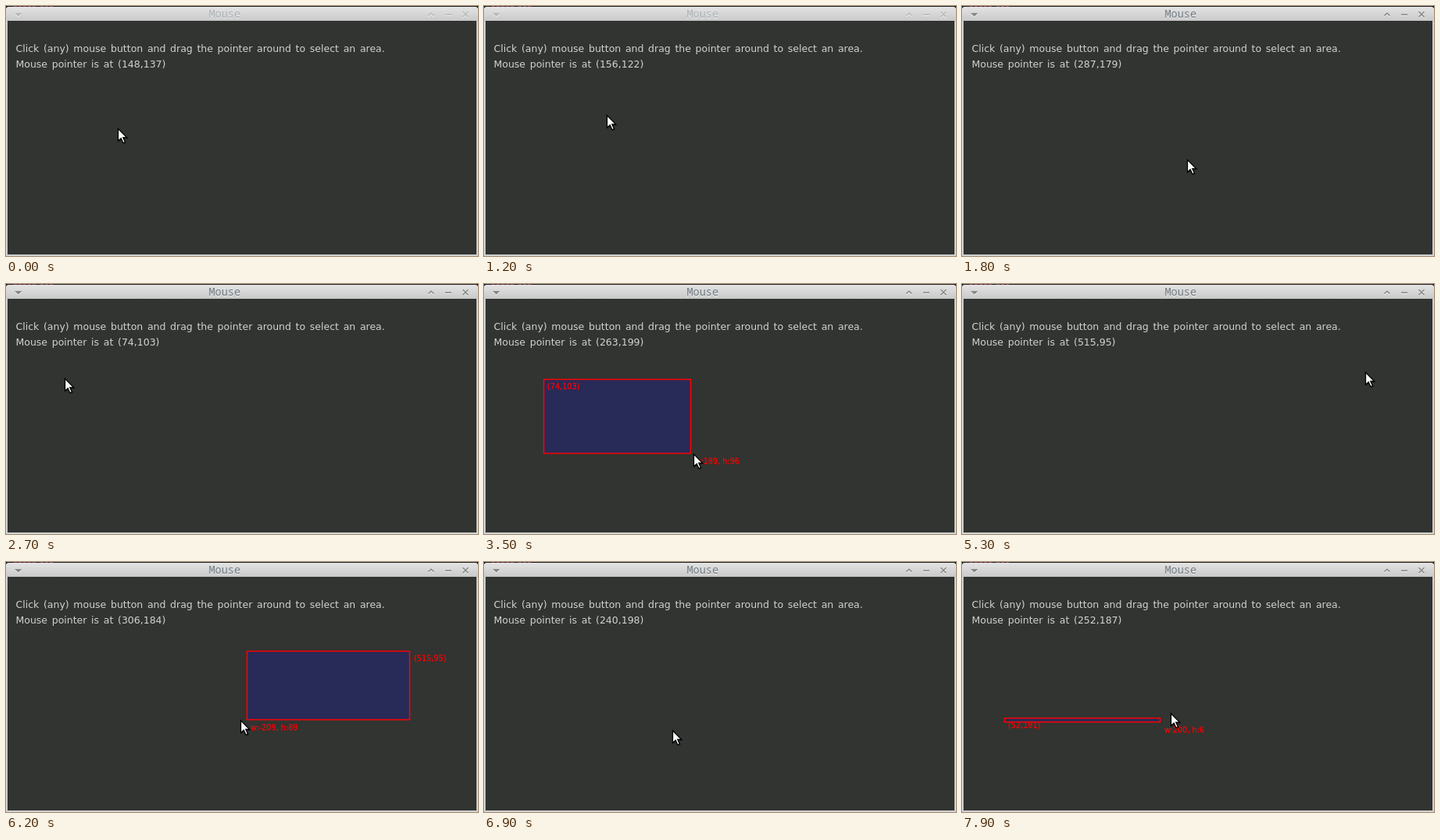
An HTML page for the animation above (8 s loop, 604 px wide and 321 px high).

```html
<!DOCTYPE html>
<html lang="en">
<head>
<meta charset="utf-8">
<title>Mouse</title>
<style>
  html, body { margin: 0; width: 100%; height: 100%; overflow: hidden; background: #1d1d1f; }
  svg { display: block; }
  text { white-space: pre; }
  .info { font: 12.5px "DejaVu Sans", sans-serif; word-spacing: 1.7px; fill: #d2d2d2; }
  .tag { font: 9.7px "DejaVu Sans", sans-serif; fill: #f00; stroke: #f00; stroke-width: .25; }
  .title { font: 13.5px "Noto Sans Mono", "DejaVu Sans Mono", monospace; fill: var(--ink); }
  #bar { --ink: #a9b1b4; --icon: #b6b6b6; }
  #bar.active { --ink: #6e7a82; --icon: #858585; }
  .line { fill: none; stroke: var(--icon); stroke-width: 1.5; }
  .solid { fill: var(--icon); }
  .glow { fill: #f4f4f4; }
  .line.glow { fill: none; stroke: #f4f4f4; }
</style>
</head>
<body>
<svg width="604" height="321" viewBox="0 0 604 321">
  <defs>
    <linearGradient id="metal" x2="0" y2="1">
      <stop offset="0" stop-color="#e4e4e4"/>
      <stop offset="1" stop-color="#c9c9c9"/>
    </linearGradient>
    <path id="caret" d="M540.5 12.5 L544 9.2 L547.5 12.5"/>
    <path id="dash" d="M562 11 H570"/>
    <path id="cross" d="M584.5 7.2 L591.5 14.2 M591.5 7.2 L584.5 14.2"/>
    <path id="menu" d="M11 9 H20.5 L15.75 13.5 Z"/>
    <path id="arrow" d="M0 0 V15.8 L3.7 12.4 L6.4 18.3 L9 17.2 L6.3 11.5 H11.3 Z"/>
  </defs>

  <path d="M10 .5 H40 M44 .5 H62" stroke="#7d3a50" stroke-dasharray="4 2"/>
  <path d="M0 321 V5 Q0 1 4 1 H600 Q604 1 604 5 V321 Z" fill="#d0d0d0"/>
  <g id="bar">
    <path d="M0 19 V5 Q0 1 4 1 H600 Q604 1 604 5 V19 Z" fill="url(#metal)"/>
    <g transform="translate(0 1)">
      <use href="#menu" class="glow"/>
      <use href="#caret" class="line glow"/>
      <use href="#dash" class="line glow"/>
      <use href="#cross" class="line glow"/>
      <text class="title glow" x="259.5" y="15">Mouse</text>
    </g>
    <use href="#menu" class="solid"/>
    <use href="#caret" class="line"/>
    <use href="#dash" class="line"/>
    <use href="#cross" class="line"/>
    <text class="title" x="259.5" y="15">Mouse</text>
  </g>
  <rect x="2" y="19" width="600" height="300" fill="#313431"/>

  <text class="info" x="12.5" y="59">Click (any) mouse button and drag the pointer around to select an area.</text>
  <text class="info" x="12.5" y="79" id="where"></text>

  <g id="select">
    <rect id="area" fill="#282a57" stroke="#f00" stroke-width="1.5" stroke-linejoin="round"/>
    <text class="tag" id="from"></text>
    <text class="tag" id="size"></text>
  </g>

  <g id="cursor">
    <use href="#arrow" x="1.5" y="1.5" fill="#000" opacity=".3"/>
    <use href="#arrow" fill="#fff" stroke="#000" stroke-width="1.3"/>
  </g>
</svg>
<script>
const LOOP = 8000, STEP = 100, LAG = 40, FOCUS = 1700;
const LEFT = 2, TOP = 19;

// where the pointer turns or rests: time, x, y inside the window
const path = [
  [-40, 148, 137], [50, 135, 142], [600, 338, 177],
  [1160, 156, 122], [1240, 155, 121], [1750, 287, 179], [2000, 287, 179],
  [2600, 74, 103], [2850, 74, 103], [3460, 263, 199], [4350, 350, 222],
  [4700, 350, 222], [5260, 515, 95], [5500, 515, 95], [6160, 306, 184],
  [6550, 240, 198], [7060, 240, 198], [7400, 52, 181], [7500, 52, 181],
  [7750, 165, 221], [7860, 252, 187], [7900, 266, 176]
];

// button presses and releases
const drags = [[2800, 4700], [5400, 6900], [7500, LOOP]];

const $ = id => document.getElementById(id);

function set(el, attrs) {
  for (const key in attrs) el.setAttribute(key, attrs[key]);
}

function pointer(t) {
  const i = path.findIndex(p => p[0] >= t);
  if (i <= 0) return path[i].slice(1);
  const [t0, x0, y0] = path[i - 1], [t1, x1, y1] = path[i];
  const k = (t - t0) / (t1 - t0);
  return [Math.round(x0 + (x1 - x0) * k), Math.round(y0 + (y1 - y0) * k)];
}

function tag(el, x, y, text) {
  set(el, { x: x + LEFT + 5, y: y + TOP + 13 });
  el.textContent = text;
}

function draw(t) {
  const [cx, cy] = pointer(t);
  const [x, y] = pointer(t - LAG); // the window reacts a little late
  const drag = drags.find(([down, up]) => t >= down && t < up);

  set($("bar"), { class: t >= FOCUS ? "active" : "" });
  set($("cursor"), { transform: `translate(${cx + 1.5} ${cy + 18.5})` });
  $("where").textContent = `Mouse pointer is at (${x},${y})`;

  set($("select"), { visibility: drag ? "visible" : "hidden" });
  if (!drag) return;
  const [ax, ay] = pointer(drag[0]);
  const w = x - ax, h = y - ay;
  set($("area"), {
    x: Math.min(x, ax) + LEFT + .5,
    y: Math.min(y, ay) + TOP + .5,
    width: Math.max(0, Math.abs(w) - 1),
    height: Math.max(0, Math.abs(h) - 1)
  });
  tag($("from"), ax, ay, `(${ax},${ay})`);
  tag($("size"), x, y, `w:${w}, h:${h}`);
}

const start = performance.now();
function tick() {
  const t = (performance.now() - start) % LOOP;
  draw(Math.floor(t / STEP) * STEP);
  requestAnimationFrame(tick);
}
tick();
</script>
</body>
</html>
```
